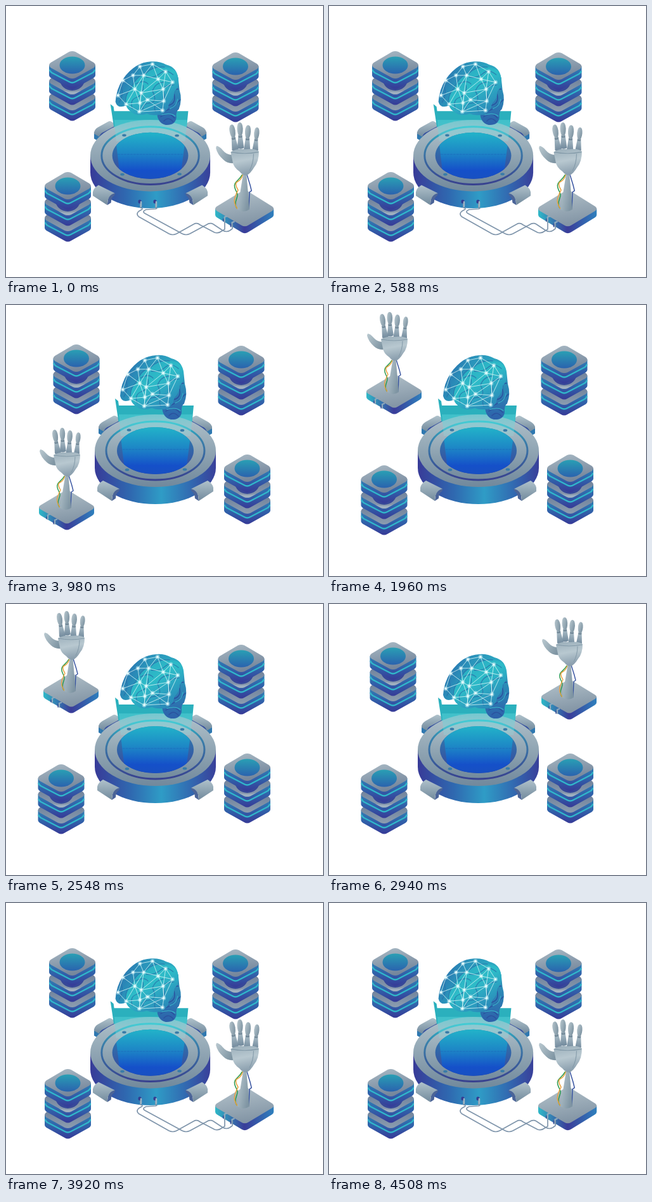
An HTML page that plays this animation: 500 px wide and 426 px high, repeating every 4.9 s.

```html
<!DOCTYPE html>
<html lang="en">
<head>
<meta charset="utf-8">
<title>Robotics lab</title>
<style>
  html, body { margin: 0; width: 100%; height: 100%; overflow: hidden; background: #fff; }
  svg { display: block; width: 500px; height: 426px; }
  .line { fill: none; stroke-linecap: round; stroke-linejoin: round; }
</style>
</head>
<body>
<svg viewBox="0 0 500 426">
  <defs>
    <linearGradient id="metal" x2="0" y2="1"><stop stop-color="#b0c2cb"/><stop offset="1" stop-color="#71899c"/></linearGradient>
    <linearGradient id="plate" x2=".3" y2="1"><stop stop-color="#a9bac5"/><stop offset="1" stop-color="#76879c"/></linearGradient>
    <linearGradient id="pad" x2=".3" y2="1"><stop stop-color="#b5c4cc"/><stop offset="1" stop-color="#8496a6"/></linearGradient>
    <linearGradient id="lower" x2="0" y2="1"><stop stop-color="#5d6f94"/><stop offset=".5" stop-color="#7688a0"/><stop offset="1" stop-color="#8c9db0"/></linearGradient>
    <linearGradient id="lens" x2="0" y2="1"><stop stop-color="#2a9fb4"/><stop offset="1" stop-color="#2a63ae"/></linearGradient>
    <linearGradient id="edge" x2="0" y2="1"><stop stop-color="#2f80b5"/><stop offset=".5" stop-color="#315fa9"/><stop offset="1" stop-color="#363a97"/></linearGradient>
    <linearGradient id="drum"><stop stop-color="#383b98"/><stop offset=".3" stop-color="#2f69b0"/><stop offset=".55" stop-color="#2f9cc6"/><stop offset=".8" stop-color="#3268b0"/><stop offset="1" stop-color="#39409a"/></linearGradient>
    <linearGradient id="groove" x2="0" y2="1"><stop stop-color="#25c4cf"/><stop offset=".3" stop-color="#3a83ac"/><stop offset="1" stop-color="#38418f"/></linearGradient>
    <linearGradient id="well" x2="0" y2="1"><stop stop-color="#2c86b4"/><stop offset="1" stop-color="#38439c"/></linearGradient>
    <linearGradient id="pool" x2="0" y2="1"><stop stop-color="#22b6c9"/><stop offset=".45" stop-color="#1d86c6"/><stop offset=".8" stop-color="#1550c9"/><stop offset="1" stop-color="#1850c0"/></linearGradient>
    <linearGradient id="glow" x2="0" y2="1"><stop stop-color="#4ccbd2" stop-opacity=".6"/><stop offset="1" stop-color="#8fe0e4" stop-opacity=".25"/></linearGradient>
    <linearGradient id="cortex" x2="1" y2=".5"><stop stop-color="#2b62aa"/><stop offset=".4" stop-color="#2a92ba"/><stop offset="1" stop-color="#2fb8c6"/></linearGradient>
    <linearGradient id="lobe" x2=".7" y2="1"><stop stop-color="#28a3bf"/><stop offset=".5" stop-color="#2ebcc8"/><stop offset="1" stop-color="#2a86b8"/></linearGradient>
    <linearGradient id="stem" x2="0" y2="1"><stop stop-color="#2d9fbd"/><stop offset="1" stop-color="#2d60aa"/></linearGradient>
    <linearGradient id="skin" x2="1" y2=".6"><stop stop-color="#bac9d0"/><stop offset="1" stop-color="#7f95a3"/></linearGradient>
    <linearGradient id="palm" x2=".2" y2="1"><stop stop-color="#9aaeba"/><stop offset=".5" stop-color="#b8c8d0"/><stop offset="1" stop-color="#8b9fae"/></linearGradient>
    <linearGradient id="box"><stop stop-color="#2fb9c8"/><stop offset=".5" stop-color="#3a3c99"/><stop offset="1" stop-color="#2f80bd"/></linearGradient>
    <clipPath id="wellClip"><ellipse cx="235.5" cy="229" rx="60.5" ry="37"/></clipPath>

    <g id="slab">
      <path fill="url(#edge)" d="M-36.500 22V38Q-36 41-32 43L-5 58Q0 61 5 58L32 43Q36 41 36.500 38V22Z"/>
      <path class="line" stroke="#31b7ca" stroke-width="2.4" d="M-35.500 30Q-35 32-32 34L-5 48Q0 51 5 48L32 34Q35 32 35.500 30"/>
      <path d="M-5 1Q0-1 5 1L34 18Q39 22 34 26L5 42Q0 44-5 42L-34 26Q-39 22-34 18Z"/>
    </g>
    <g id="stack">
      <use href="#slab" y="50" fill="url(#lower)"/>
      <ellipse cy="66" rx="20" ry="13" fill="#374898"/>
      <use href="#slab" y="25" fill="url(#lower)"/>
      <ellipse cy="43" rx="20" ry="19" fill="#374898"/>
      <path fill="#9fb0c0" d="M-14 62Q0 66 14 62L5 67Q0 69-5 67Z"/>
      <use href="#slab" fill="url(#plate)"/>
      <ellipse cy="22" rx="20" ry="13.5" fill="url(#lens)"/>
    </g>

    <g id="backClamp">
      <path fill="#36509f" d="M153 193L178 180V200L154 207Z"/>
      <path fill="#2f78b0" d="M146 191L156 194L153 206L146 202Z"/>
      <path fill="url(#metal)" d="M146 194V192Q147 187 152 184L168 175Q171 173 174 175L182 180L162 191Q156 193 154 199Z"/>
    </g>
    <g id="frontClamp">
      <path fill="#4b6498" d="M167 308L168 299Q170 291 180 289L178 293Q173 296 173 304Z"/>
      <path fill="url(#metal)" d="M144 293V287Q145 281 153 276L179 289Q167 292 167 308Z"/>
    </g>

    <g id="machine">
      <use href="#backClamp"/>
      <use href="#backClamp" transform="matrix(-1 0 0 1 471 0)"/>
      <path fill="#2bb0bd" d="M172 147L177 151L178 158H296L292 200H180Z"/>
      <path fill="url(#drum)" d="M140 229V256A95.5 57 0 0 0 331 256V229Z"/>
      <ellipse cx="235.5" cy="229" rx="95.5" ry="57" fill="url(#metal)"/>
      <ellipse cx="235.5" cy="229" rx="77.5" ry="46" fill="url(#metal)" stroke="url(#groove)" stroke-width="3"/>
      <path fill="url(#glow)" d="M178 172H294.500L291 206H181Z"/>
      <ellipse cx="235.5" cy="229" rx="60.5" ry="37" fill="url(#well)"/>
      <path clip-path="url(#wellClip)" fill="url(#pool)" d="M179 190H293L283 268H188Z"/>
      <path class="line" stroke="#1d62b8" stroke-dasharray="3 2" opacity=".6" d="M184 227H288"/>
      <g fill="#387ba8">
        <ellipse cx="194" cy="196.500" rx="3.300" ry="2"/><ellipse cx="278" cy="197" rx="3.300" ry="2"/>
        <ellipse cx="191" cy="259" rx="3.300" ry="2"/><ellipse cx="282" cy="258.500" rx="3.300" ry="2"/>
      </g>
      <use href="#frontClamp"/>
      <use href="#frontClamp" transform="matrix(-1 0 0 1 471 0)"/>
      <g id="brain">
        <path fill="url(#stem)" d="M246 160Q247 177 260 180Q275 181 277 169Q276 158 281 155Q287 140 282 124L280 104L250 130Z"/>
        <g class="line" stroke="#2b529f" stroke-width="1.500">
          <path d="M259 158Q270 154 283 140M264 149Q276 146 274 134T280 123M252 167Q265 158 274 169M257 174Q264 166 272 175"/>
          <path stroke="#37a9c5" d="M267 154Q278 150 279 139M254 164Q268 160 275 166"/>
        </g>
        <path fill="url(#cortex)" d="M180 143Q181 124 192 107Q211 80 237 79Q250 78 261 84Q278 88 280 106Q281 119 274 127Q274 136 265 146Q264 158 253 163Q239 166 230 162Q215 167 205 159Q199 155 197 149Q183 155 180 143Z"/>
        <path fill="url(#lobe)" d="M197 149Q194 132 205 122Q213 102 228 98Q240 86 258 88Q278 89 280 106Q281 119 274 127Q274 136 265 146Q264 158 253 163Q239 166 230 162Q215 167 205 159Q199 155 197 149Z"/>
        <path class="line" stroke="#286fa9" stroke-width="1.300" opacity=".75" d="M186 144Q193 133 190 121T207 102M197 149Q194 132 205 122Q213 102 228 98Q240 86 258 88M207 154Q202 140 214 136T224 117M224 157Q222 146 235 145T239 126Q244 112 258 112M244 159Q239 149 250 145T257 129T273 116M229 104Q242 106 251 98T272 100M212 115Q225 107 232 115"/>
        <path id="links" class="line" stroke="#d8f6f7" stroke-width=".8"/>
        <g id="nodes" fill="#eaffff"/>
      </g>
    </g>

    <g id="finger">
      <path fill="url(#metal)" d="M-3 8Q0 3 3 8L5 25Q0 28-5 25Z"/>
      <path fill="#718797" d="M-3 6Q0 10 3 6L2.500 10H-2.500Z"/>
      <path fill="url(#skin)" d="M-4.300-3Q-4-12 0-12Q4-12 4.300-3Q4 6 1 8H-1Q-4 6-4.300-3Z"/>
    </g>
    <g id="hand">
      <path fill="url(#box)" d="M335 146V155Q335 157 338 159L374 180Q379 183 384 180L419 159Q422 157 422 155V146Z"/>
      <path fill="url(#pad)" d="M374 121Q379 118 384 121L420 143Q424 146 420 149L384 170Q379 173 374 170L337 149Q333 146 337 143Z"/>
      <g class="line" stroke="#8fa9bd" stroke-width="2.200">
        <path d="M349 165V158L352 157M360 172V166L363 165"/>
        <path stroke="#374b97" stroke-width="1.500" d="M347 161V164M358 168V172"/>
      </g>
      <g class="line" stroke-width="1.400">
        <path stroke="#29984b" d="M375 97C370 106 362 107 364 115S370 123 367 131S365 142 367 145"/>
        <path stroke="#e9a13b" d="M376 97Q373 105 368 107T369 119Q366 124 364 131T368 146"/>
        <path stroke="#35519f" d="M382 96L387 112L389 120L386 122L385 146"/>
      </g>
      <path fill="url(#skin)" d="M376.500 96H381.500L386 147Q377 153 368 147Z"/>
      <use href="#finger" transform="translate(361 36) rotate(-9)"/>
      <use href="#finger" transform="translate(372 33) rotate(-2)"/>
      <use href="#finger" transform="translate(383.500 37) rotate(3)"/>
      <use href="#finger" transform="translate(396.500 39) rotate(5) scale(.9)"/>
      <path fill="url(#skin)" d="M337 55Q341 55 346 61Q352 68 360 68L363 80Q353 81 347 75Q338 67 336 58Z"/>
      <path fill="url(#palm)" d="M358 64Q367 58 380 60Q394 58 400 63Q400 78 393 86Q387 96 381 98Q376 98 371 92Q362 86 361 78Z"/>
      <path class="line" stroke="#8299a8" d="M359 64Q378 68 399 64M392 67Q392 80 386 91"/>
    </g>
    <g id="cable" class="line">
      <path stroke="#7f95ab" stroke-width="1.700" d="M212 309V317Q217 318 214 320L209 323Q205 327 209 331L257 358Q263 361 269 358L296 343Q301 340 306 344L329 356Q335 358 340 354L345 351V339M236 309V317Q240 318 236 319L221 320Q214 323 219 326L278 358Q284 361 290 358L316 344Q322 340 327 343L342 353Q348 356 353 353L357 350V343"/>
      <path stroke="#343c91" stroke-width="5" d="M211 307V308M235 307V308"/>
      <path stroke="#9db4c4" stroke-width="2.500" d="M213 308V315M237 308V315"/>
    </g>
  </defs>
  <g id="stage"></g>
</svg>
<script>
const $ = id => document.getElementById(id);

const nodes = [[184,133], [192,109], [208,101], [219,87], [239,83], [260,95], [248,107],
  [271,112], [225,101], [221,129], [211,123], [197,147], [219,145], [231,140],
  [256,123], [257,142], [255,157], [218,159]];
const chains = [[0,1,2,3,4,5,7,15,16,17,11,0], [1,10,2,8,4,6,5,14,7,6,8,9,10,0],
  [10,11,12,9,6,14,13,9,17,13,15,14], [3,8,10,12,13,16], [9,14,15,17,12]];
$("links").setAttribute("d", chains.map(c => "M" + c.map(i => nodes[i]).join("L")).join(""));
$("nodes").innerHTML = nodes.map(([x, y]) =>
  `<circle cx="${x}" cy="${y}" r="3.4" opacity=".4"/><circle cx="${x}" cy="${y}" r="1.7"/>`).join("");

const use = (id, transform = "") => `<use href="#${id}" transform="${transform}"/>`;
const move = (id, x, y) => use(id, `translate(${x} ${y})`);
const stacks = places => places.map(([x, y]) => move("stack", x, y)).join("");

const wired = stacks([[104.5,71], [362,73], [97.5,261]])
  + use("machine", "translate(133 179) scale(.99 .986) translate(-140 -172)")
  + use("hand", "translate(330 183) scale(1.06 1.085) translate(-335 -21)") + use("cable");
const scenes = [
  wired,
  stacks([[111,62], [371,64], [380.5,235]]) + use("machine") + move("hand", -283, 172),
  stacks([[371,64], [87,252], [380.5,235]]) + use("machine") + move("hand", -276, -10),
  stacks([[101,60], [87,252], [380.5,235]]) + use("machine") + use("hand"),
  wired
];

const HOLD = 980;
let shown = -1;
function draw() {
  const scene = Math.floor(performance.now() / HOLD) % scenes.length;
  if (scene !== shown) $("stage").innerHTML = scenes[shown = scene];
  requestAnimationFrame(draw);
}
draw();
</script>
</body>
</html>
```
